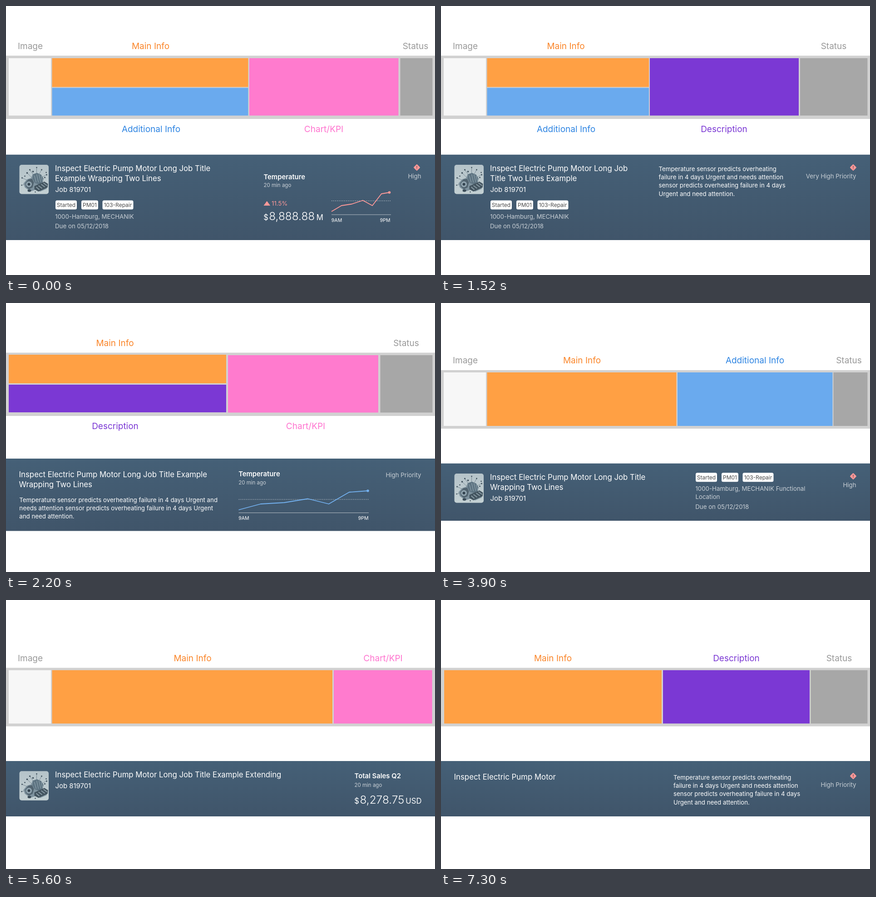
An HTML page that plays this animation: 945x593 px, repeating every 8000 ms.

```html
<!DOCTYPE html>
<html lang="en">
<head>
<meta charset="utf-8">
<title>Object header layouts</title>
<style>
  html, body { margin: 0; width: 100%; height: 100%; overflow: hidden; background: #fff; }
  svg { display: block; width: 945px; height: 593px; font-family: Inter, "Open Sans", sans-serif; }
  text { fill: #fff; white-space: pre; }
  .label { font-size: 19px; text-anchor: middle; }
  .title { font-size: 16.8px; }
  .job { font-size: 14.9px; }
  .chip { font-size: 12px; fill: #4a4a4a; text-anchor: middle; }
  .meta { font-size: 13.3px; fill: #c9d0d6; }
  .desc { font-size: 13.3px; }
  .status { font-size: 13.3px; fill: #c9d0d6; text-anchor: end; }
  .head { font-size: 14.8px; font-weight: 600; }
  .ago { font-size: 11.5px; fill: #c9d0d6; }
  .trend { font-size: 13.3px; fill: #ff9999; }
  .num { font-size: 24.4px; font-weight: 300; }
  .unit { font-size: 16.8px; }
  .axis { font-size: 10.6px; }
  .end { text-anchor: end; }
</style>
</head>
<body>
<svg id="stage" viewBox="0 0 945 593">
  <defs>
    <linearGradient id="slate" x1="0" y1="0" x2="0" y2="1">
      <stop offset="0" stop-color="#456077"/>
      <stop offset="1" stop-color="#40556a"/>
    </linearGradient>
    <linearGradient id="paper" x1="0" y1="0" x2="0" y2="1">
      <stop offset="0" stop-color="#b5c3c9"/>
      <stop offset="1" stop-color="#c3d0d3"/>
    </linearGradient>
    <g id="motor">
      <rect width="64.5" height="64.5" rx="5" fill="url(#paper)"/>
      <path d="M9 41l8-9 9-3 3-8 9-3 10 4 5 9-2 9 10 5-1 8-14 6-10-4-9 3-8-3-7-5z" fill="#7e929e"/>
      <path d="M30 21l9-3 9 4 5 8-2 8-8 5-9-3-5-9z" fill="#5d7381"/>
      <path d="M13 40l7-8 8-1 4 8-3 11-8 4-7-6z" fill="#51636f"/>
      <circle cx="21" cy="43" r="6.5" fill="#8fa3ae"/>
      <circle cx="21" cy="43" r="3" fill="#33434f"/>
      <path d="M33 24l4 15M38 21l4 18M43 21l4 17M48 24l3 12" stroke="#8599a4" stroke-width="1.5"/>
      <path d="M33 47l22-10 8 5-1 8-20 9-9-5z" fill="#43545f"/>
      <path d="M37 49l7 6M42 46l8 6M48 43l8 6M53 40l8 6" stroke="#8b9da7" stroke-width="2"/>
      <path d="M29 30l-12-12M32 24l-9-13M38 19V6M44 20l5-9M51 27l9-6M17 34L6 29M13 43l-8 2" stroke="#71838e" stroke-width=".9"/>
      <g fill="#3a4b57">
        <circle cx="38" cy="6" r="1.3"/><circle cx="23" cy="11" r="1.6"/>
        <circle cx="17" cy="18" r="1.8"/><circle cx="49" cy="11" r="1.4"/>
        <circle cx="59" cy="17" r="1.3"/><circle cx="60" cy="22" r="1.5"/>
        <circle cx="6" cy="29" r="1.4"/><circle cx="30" cy="15" r="1.8"/>
        <circle cx="12" cy="25" r="1.3"/><circle cx="56" cy="28" r="1.5"/>
        <circle cx="5" cy="45" r="1.2"/><ellipse cx="22" cy="57" rx="4" ry="2.8"/>
        <circle cx="35" cy="60" r="1.2"/>
      </g>
    </g>
    <g id="alert">
      <rect x="-5.3" y="-5.3" width="10.6" height="10.6" rx="1.4" transform="rotate(45)" fill="#f99"/>
      <path d="M0-3.4V1" stroke="#6b4a55" stroke-width="1.4"/>
      <circle cy="2.9" r=".8" fill="#6b4a55"/>
    </g>
  </defs>
</svg>
<script>
const stage = document.getElementById('stage');
const FILL = { image: '#f7f7f7', main: '#ffa044', extra: '#6aaaee', desc: '#7b38d4', kpi: '#ff7bce', status: '#a7a7a7' };
const INK = { image: '#999', main: '#fa8529', extra: '#2d84e2', desc: '#7b38d4', kpi: '#ff74cf', status: '#999' };
const NAME = { image: 'Image', main: 'Main Info', extra: 'Additional Info', desc: 'Description', kpi: 'Chart/KPI', status: 'Status' };

const text = (cls, x, y, s) => `<text class="${cls}" x="${x}" y="${y}">${s}</text>`;
const lines = (cls, x, y, step, list) => list.map((s, i) => text(cls, x, y + i * step, s)).join('');
const rect = (x1, y1, x2, y2, fill, rx = 0) =>
  `<rect x="${x1}" y="${y1}" width="${x2 - x1}" height="${y2 - y1}" rx="${rx}" fill="${fill}"/>`;
const use = (id, x, y) => `<use href="#${id}" x="${x}" y="${y}"/>`;

const bar = (y1, y2) => rect(0, y1, 945, y2, '#d1d1d1');
const panel = (y1, y2) => rect(0, y1, 945, y2, 'url(#slate)');
const box = (kind, x1, y1, x2, y2) => rect(x1, y1, x2, y2, FILL[kind]);
const label = (kind, x, y) =>
  `<text class="label" x="${x}" y="${y}" style="fill:${INK[kind]}">${NAME[kind]}</text>`;

const title = (x, y, ...list) => lines('title', x, y, 22.2, list);
const desc = (x, y, ...list) => lines('desc', x, y, 18.3, list);
const status = (x, y, s) => use('alert', x, y - 24) + text('status', 914.6, y, s);

function chips(x, y) {
  return [[0, 47, 'Started'], [57, 94, 'PM01'], [103.5, 171.5, '103-Repair']].map(([a, b, s]) =>
    rect(x + a, y, x + b, y + 20, '#fff', 3.5) + text('chip', x + (a + b) / 2, y + 14.4, s)).join('');
}

function chart(pts, x1, x2, dotY, axisY, color) {
  const [ex, ey] = pts[pts.length - 1];
  return `<path d="M${x1} ${dotY}H${x2}" stroke="#b9c3cb" stroke-dasharray="2 2"/>` +
    `<path d="M${x1} ${axisY}H${x2}" stroke="#b4bcc3" stroke-width="1.2"/>` +
    `<polyline points="${pts.join(' ')}" fill="none" stroke="${color}" stroke-width="1.8" stroke-linejoin="round"/>` +
    `<circle cx="${ex}" cy="${ey}" r="2.8" fill="${color}"/>`;
}

const ALERT_TEXT = ['Temperature sensor predicts overheating', 'failure in 4 days Urgent and needs attention',
  'sensor predicts overheating failure in 4 days', 'Urgent and need attention.'];
const PLACE = '1000-Hamburg, MECHANIK', DUE = 'Due on 05/12/2018', JOB = 'Job 819701';

const jobInfo = (...head) => use('motor', 29.5, 350) + title(108, 363.6, ...head) + text('job', 108.5, 409.5, JOB) +
  chips(109, 428.5) + text('meta', 108.3, 469, PLACE) + text('meta', 108, 489.6, DUE);

const scenes = [
  [0, [
    label('image', 53.5, 95), label('main', 318.5, 95), label('status', 902, 95),
    label('extra', 319.5, 278), label('kpi', 700, 278),
    bar(109.5, 249), box('image', 6, 115, 99, 241.5), box('main', 101.5, 115, 533.5, 178.5),
    box('extra', 101.5, 180.5, 533.5, 241.5), box('kpi', 536, 115, 864.5, 241.5), box('status', 868.5, 115, 939.5, 241.5),
    panel(327.7, 516), jobInfo('Inspect Electric Pump Motor Long Job Title', 'Example Wrapping Two Lines'),
    text('head', 567.5, 382, 'Temperature'), text('ago', 567.5, 398.8, '20 min ago'),
    '<path d="M567.5 440l7.3-10 7.3 10z" fill="#f99"/>', text('trend', 585, 440, '11.5%'),
    text('unit', 567.3, 471.6, '$'), text('num', 579.2, 472, '8,888.88'), text('unit', 683.8, 472, 'M'),
    chart([[717, 453], [739, 440], [762, 436.5], [786, 428.5], [807, 440], [827, 414], [844.5, 411]], 717, 848, 429.5, 460, '#ff9999'),
    text('axis', 716.8, 475.6, '9AM'), text('axis end', 846.6, 475.6, '9PM'),
    status(905, 380, 'High')
  ]],
  [500, [
    label('image', 53.5, 95), label('main', 275, 95), label('status', 865, 95),
    label('extra', 275.5, 278), label('desc', 623.5, 278),
    bar(109.5, 249), box('image', 6, 115, 99, 241.5), box('main', 101.5, 115, 458, 178.5),
    box('extra', 101.5, 180.5, 458, 241.5), box('desc', 460, 115, 788, 241.5), box('status', 791, 115, 939.5, 241.5),
    panel(327.7, 516), jobInfo('Inspect Electric Pump Motor Long Job', 'Title Two Lines Example'),
    desc(479.5, 363.8, ...ALERT_TEXT), status(908, 380, 'Very High Priority')
  ]],
  [2200, [
    label('main', 240, 95), label('status', 881.5, 95), label('desc', 240.5, 278), label('kpi', 660, 278),
    bar(109.5, 249), box('main', 6, 114, 485, 177), box('desc', 6, 180, 485, 241),
    box('kpi', 489, 115, 820, 241.5), box('status', 824.5, 115, 939.5, 241.5),
    panel(343, 502.5),
    title(28.6, 383.6, 'Inspect Electric Pump Motor Long Job Title Example', 'Wrapping Two Lines'),
    desc(29.3, 438.7, 'Temperature sensor predicts overheating failure in 4 days Urgent and',
      'needs attention sensor predicts overheating failure in 4 days Urgent', 'and need attention.'),
    text('head', 512.2, 381.5, 'Temperature'), text('ago', 512.2, 399.8, '20 min ago'),
    chart([[512.5, 456], [561, 443], [613, 440], [665, 431.5], [711, 443], [756, 417], [797, 414]], 512.5, 799, 433, 462.5, '#73b1f0'),
    text('axis', 512.2, 478.2, '9AM'), text('axis end', 798.6, 478.2, '9PM'),
    text('status', 914.6, 383.6, 'High Priority')
  ]],
  [3900, [
    label('image', 53.5, 133), label('main', 310.5, 133), label('extra', 691.5, 133), label('status', 898.5, 133),
    bar(148, 277), box('image', 6, 153, 99, 271), box('main', 101.5, 153, 518.5, 271),
    box('extra', 521, 153, 862.5, 271), box('status', 864.5, 153, 939.5, 271),
    panel(353.7, 480), use('motor', 29.5, 376),
    title(108, 389.6, 'Inspect Electric Pump Motor Long Job Title', 'Wrapping Two Lines'), text('job', 108.5, 435.5, JOB),
    chips(561, 374.3), lines('meta', 560.4, 414, 18.3, [PLACE + ' Functional', 'Location']), text('meta', 560.2, 453.8, DUE),
    status(908, 406, 'High')
  ]],
  [5600, [
    label('image', 53.5, 134.6), label('main', 411, 134.6), label('kpi', 830.5, 134.6),
    bar(149.5, 278.5), box('image', 6, 154.7, 99, 272.3), box('main', 101.5, 154.7, 719, 272.3),
    box('kpi', 722, 154.7, 938.7, 272.3),
    panel(355, 477), use('motor', 29.5, 377.3),
    title(108, 391, 'Inspect Electric Pump Motor Long Job Title Example Extending'), text('job', 108.5, 414.8, JOB),
    text('head', 767.6, 393.3, 'Total Sales Q2'), text('ago', 767.5, 411.8, '20 min ago'),
    text('unit', 767.3, 448.6, '$'), text('num', 779.4, 449, '8,278.75'), text('unit end', 915.6, 449, 'USD')
  ]],
  [7300, [
    label('main', 246.5, 134.6), label('desc', 650.5, 134.6), label('status', 877, 134.6),
    bar(149.5, 278.5), box('main', 7, 154.7, 486, 272.3), box('desc', 489, 154.7, 812, 272.3),
    box('status', 814.5, 154.7, 939.5, 272.3),
    panel(355, 477), title(28.6, 395.6, 'Inspect Electric Pump Motor'),
    desc(512, 395.8, ...ALERT_TEXT), status(908, 412, 'High Priority')
  ]]
];
const LOOP = 8000;

stage.insertAdjacentHTML('beforeend',
  scenes.map(([, parts]) => `<g class="scene" display="none">${parts.join('')}</g>`).join(''));
const groups = [...stage.querySelectorAll('.scene')];
const start = performance.now();
let shown = -1;

function draw() {
  const t = (performance.now() - start) % LOOP;
  const now = scenes.filter(([at]) => at <= t).length - 1;
  if (now !== shown) {
    groups.forEach((g, i) => g.setAttribute('display', i === now ? 'inline' : 'none'));
    shown = now;
  }
  requestAnimationFrame(draw);
}
draw();
</script>
</body>
</html>
```
